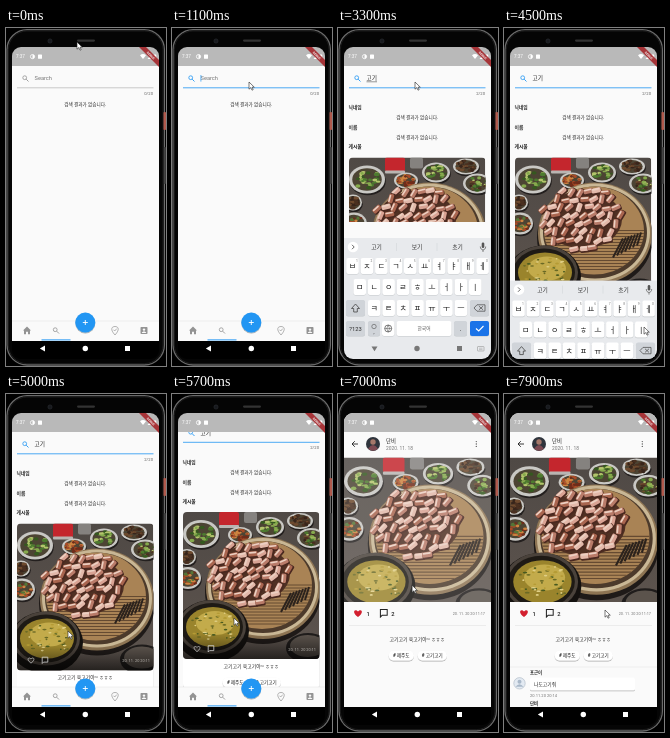
These frames come from a looping animation (160 by 338 pixels, 8000 ms). An HTML page:

```html
<!DOCTYPE html>
<html lang="ko">
<head>
<meta charset="utf-8">
<title>Search and open a post</title>
<style>
html, body { margin: 0; width: 100%; height: 100%; overflow: hidden; background: #000; }
svg { display: block; width: 100vw; height: 100vh; }
text { font-family: Roboto, "Noto Sans CJK KR", "Noto Sans CJK", sans-serif; }
</style>
</head>
<body>
<svg id="stage" viewBox="0 0 160 338"></svg>
<script>
const LOOP = 8000, STEP = 100;
const BLUE = '#2196f3', GREY = '#949494', INK = '#2b2b2b';

// Markup helpers
const text = (x, y, size, s, fill = INK, anchor = 'start', extra = '') =>
  `<text x="${x}" y="${y}" font-size="${size}" fill="${fill}" text-anchor="${anchor}" ${extra}>${s}</text>`;
const mid = (x, y, size, s, fill, extra) => text(x, y, size, s, fill, 'middle', extra);
const rect = (x, y, w, h, fill, r = 0, extra = '') =>
  `<rect x="${x}" y="${y}" width="${w}" height="${h}" rx="${r}" fill="${fill}" ${extra}/>`;
const oval = (x, y, rx, ry, fill, extra = '') =>
  `<ellipse cx="${x}" cy="${y}" rx="${rx}" ry="${ry}" fill="${fill}" ${extra}/>`;
const dot = (x, y, r, fill, extra) => oval(x, y, r, r, fill, extra);
const path = (d, fill, extra = '') => `<path d="${d}" fill="${fill}" ${extra}/>`;
const line = (d, color, w = 0.7) => path(d, 'none', `stroke="${color}" stroke-width="${w}"`);
const group = (id, body, extra = '') => `<g id="${id}" ${extra}>${body}</g>`;
const clip = (id, body) => `<clipPath id="${id}">${body}</clipPath>`;
const shadow = 'filter="url(#soft)"';

function random(seed) {
  return () => (seed = (seed * 16807) % 2147483647) / 2147483647;
}

// Icons
const lens = (x, y, color) =>
  `<g transform="translate(${x} ${y})">` +
  dot(-0.8, -0.8, 1.9, 'none', `stroke="${color}" stroke-width=".8"`) +
  line('M.7 .7L3 3', color, 0.9) + '</g>';
const heart = (x, y, s, fill, extra = '') =>
  path('M0 3.5C-7 -1.5 -3 -5.5 0 -2C3 -5.5 7 -1.5 0 3.5Z', fill,
    `transform="translate(${x} ${y}) scale(${s})" ${extra}`);
const bubble = (x, y, s, color) =>
  path('M-4 -4H4V3H-2L-4 5Z', 'none',
    `stroke="${color}" stroke-width="1.2" transform="translate(${x} ${y}) scale(${s})"`);

// Food picture, 136 by 147
function plate(x, y, rx, ry, colors, rnd) {
  let s = oval(x + 0.8, y + 1.8, rx, ry, '#231f1e') + oval(x, y, rx, ry, '#c9c8c4') +
    oval(x, y, rx * 0.82, ry * 0.8, '#4c4433');
  for (let i = 0; i < 30; i++) {
    const a = rnd() * 6.283, d = Math.sqrt(rnd()) * 0.7;
    s += oval((x + Math.cos(a) * rx * d).toFixed(1), (y + Math.sin(a) * ry * d).toFixed(1),
      1.2 + rnd() * 1.8, 0.8 + rnd(), colors[i % colors.length]);
  }
  return s;
}

function meat(rnd) {
  const tones = ['#d9a394', '#b97b69', '#e3b9aa', '#a9654f'];
  let s = oval(68, 62, 39, 29, '#4f3023');
  for (let row = 0; row < 8; row++) {
    for (let col = 0; col < 10; col++) {
      const x = 27 + col * 9 + (row % 2) * 4 + rnd() * 3, y = 33 + row * 8 + rnd() * 3;
      if (((x - 67) / 41) ** 2 + ((y - 61) / 32) ** 2 > 1) continue;
      const turn = rnd() * 80 - 85;
      s += `<g transform="translate(${x.toFixed(1)} ${y.toFixed(1)}) rotate(${turn.toFixed(0)})">` +
        rect(-4.6, -2.2, 10, 6, '#4a281f', 1.5) +
        rect(-4.7, -2.9, 9.4, 5, tones[Math.floor(rnd() * 4)], 1.4) +
        rect(-4, -2.4, 7.6, 1.6, '#ecd0c2', 0.8) + '</g>';
    }
  }
  return s;
}

function food() {
  const rnd = random(73);
  const greens = ['#4d7b2f', '#86aa4d', '#35581f', '#b3c46c'];
  const kimchi = ['#a84a26', '#cf8440', '#6f2c1a'];
  const dark = ['#38251b', '#6e4a2e', '#4a3020'];
  let s = rect(0, 0, 136, 147, 'url(#table)');
  s += rect(61, 0, 13, 11, '#85827f', 2) + rect(36, 0, 20, 14, '#c4262d', 2) +
    rect(36, 13, 20, 3, '#b9b5b2', 1);
  s += plate(18, 22, 18, 14, greens, rnd) + plate(57, 23, 12, 8, kimchi, rnd) +
    plate(87, 15, 14, 10, greens, rnd) + plate(117, 9, 13, 8, dark, rnd) +
    plate(128, 26, 14, 10, greens.concat(dark), rnd) + plate(4, 45, 9, 8, dark, rnd) +
    plate(5, 66, 13, 11, kimchi.concat('#557536'), rnd);
  s += oval(80, 80, 58, 52, '#1f1a18') + oval(80, 76, 57, 51, '#8d7453') +
    oval(80, 75, 55, 49, '#c9b795') + oval(80, 75, 52, 46, '#4c3a2b') +
    oval(79, 73, 50, 44, '#a98355');
  for (let i = 0; i < 14; i++) {
    const y = 73 + i * 3, w = 50 * Math.sqrt(1 - ((y - 73) / 44) ** 2);
    s += line(`M${79 - w} ${y}H${79 + w}`, '#654a31', 1);
  }
  for (let i = 0; i < 7; i++)
    s += line(`M${98 + i * 4} ${100 - i * 2}L${108 + i * 3} ${81 - i}`, '#2c231d', 2);
  s += meat(rnd);
  s += oval(29, 119, 37, 31, '#14110f') + oval(29, 115, 34, 27, '#4a423b') +
    oval(29, 115, 31, 24, '#1e1a15') + oval(30, 115, 27, 20, '#9a842c') +
    oval(32, 111, 19, 12, '#c3ab4b');
  for (let i = 0; i < 45; i++)
    s += oval(9 + rnd() * 42, 101 + rnd() * 27, 0.8 + rnd() * 1.6, 0.8,
      ['#e0cf86', '#6b6a25', '#47591f', '#b59b35'][i % 4]);
  return s + oval(125, 136, 22, 15, '#1f1c1b') + oval(125, 134, 18, 11, '#5b534c');
}

// Keyboard
function keyboard() {
  const key = (x, y, w, h = 16, fill = '#fff') =>
    rect(x, y + 0.6, w, h, '#c3c7ca', 2) + rect(x, y, w, h, fill, 2);
  const row = (letters, x0, y, digits) => [...letters].map((c, i) => {
    const x = x0 + i * 14.45;
    return key(x - 6.3, y, 12.6) + mid(x, y + 11.3, 8, c, '#222') +
      (digits ? text(x + 5.4, y + 4.4, 3.3, (i + 1) % 10, '#777', 'end') : '');
  }).join('');
  const dark = '#d0d4d9';
  return rect(6, 210, 147, 121, '#e8eaed') +
    dot(15, 219, 5.3, '#fff') + line('M14 216.8L16.2 219L14 221.2', '#555', 0.9) +
    rect(143.7, 214.5, 2.6, 5.5, '#555', 1.3) +
    line('M142.3 218.5C142.3 223 147.7 223 147.7 218.5M145 222V224', '#555') +
    group('hints', '') +
    row('ㅂㅈㄷㄱㅅㅛㅕㅑㅐㅔ', 14.5, 230, true) + row('ㅁㄴㅇㄹㅎㅗㅓㅏㅣ', 21.7, 251) +
    row('ㅋㅌㅊㅍㅠㅜㅡ', 36.2, 272) +
    key(8, 272, 19, 16, dark) + line('M17.5 276L13.5 280.5H15.7V284H19.3V280.5H21.5Z', '#444', 0.8) +
    key(132, 272, 19, 16, dark) +
    line('M136 280L139 276.8H147V283.2H139ZM141 278.2L145 281.8M145 278.2L141 281.8', '#444') +
    key(8, 293, 19, 15, dark) + mid(17.5, 302.8, 5.8, '?123') +
    key(30, 293, 12, 15, dark) + dot(36, 298.5, 2.2, 'none', 'stroke="#555" stroke-width=".6"') +
    mid(36, 306, 5, ',') +
    key(44, 293, 12.5, 15) + dot(50.2, 300.5, 3.5, 'none', 'stroke="#444" stroke-width=".7"') +
    line('M46.7 300.5H53.7M50.2 297Q47.4 300.5 50.2 304Q53 300.5 50.2 297', '#444', 0.5) +
    key(58.5, 293, 55, 15) + mid(86, 302.3, 4.8, '한국어', '#555') +
    key(116, 293, 13, 15, dark) + mid(122.5, 303, 7, '.') +
    key(132, 293, 19, 15, '#1a73e8') + line('M138 300.5L140.7 303L145.5 298', '#fff', 1.1) +
    path('M33.5 318.5H39.5L36.5 323.3Z', '#777') + dot(79, 320.5, 2.7, '#777') +
    rect(119, 318, 5, 5, '#777') +
    rect(139.5, 318.5, 6.5, 4.5, 'none', 0.5, 'stroke="#999" stroke-width=".6"') +
    line('M141 320.2H144.5M141 321.6H144.5', '#999', 0.5);
}

// Search screen
const EMPTY = '검색 결과가 없습니다.';
const CAPTION = '고기고기 육고기야~ ㅎㅎㅎ';
const tags = y => [[50.5, 25.5, '# 제주도'], [79.5, 29.5, '# 고기고기']].map(([x, w, s]) =>
  rect(x, y - 4.8, w, 9.6, '#fff', 4.8, shadow) +
  mid(x + w / 2, y + 1.7, 4.6, s, '#111', 'font-weight="500"')).join('');

const searchPage = () =>
  rect(6, 38, 147, 275, '#fafafa') +
  `<g clip-path="url(#body)">` + group('list',
    group('field', '') +
    group('none', mid(79.3, 78, 4.65, EMPTY)) +
    group('found',
      [['닉네임', 81], ['이름', 101], ['게시물', 120]].map(([s, y]) =>
        text(10.5, y, 4.8, s, '#222', 'start', 'font-weight="700"')).join('') +
      mid(79.3, 91, 4.65, EMPTY) + mid(79.3, 111, 4.65, EMPTY) +
      rect(11, 129.5, 136.5, 176, '#fff', 4, shadow) +
      `<g transform="translate(11 129.5)" clip-path="url(#card)"><use href="#food"/>` +
      rect(0, 122, 136.5, 25, 'url(#shade)') + '</g>' +
      heart(25, 266.5, 0.75, 'none', 'stroke="#ccc" stroke-width="1"') + bubble(39, 266, 0.7, '#ccc') +
      text(144, 268, 3.9, '20. 11. 20 20:11', '#b5b1ab', 'end') +
      mid(79.2, 285, 4.9, CAPTION) + tags(300))) + '</g>' +
  group('gap', rect(6, 194, 147, 119, '#fafafa')) +
  rect(6, 293, 147, 20, '#fafafa') + line('M6 293H153', '#e2e2e2', 0.5) +
  path('M17 302.5L21 298.5L25 302.5H24V306.3H22V303.7H20V306.3H18V302.5Z', GREY) +
  lens(50, 302.5, GREY) +
  line('M109 307C103.5 301 106 298.5 109 298.5C112 298.5 114.5 301 109 307M107.5 301.7L108.7 303L110.8 300.6', GREY) +
  rect(134.5, 299, 7, 7, GREY, 0.8) + dot(138, 301.6, 1.2, '#fafafa') +
  path('M135.8 305C136 303 140 303 140.2 305Z', '#fafafa') +
  rect(35.5, 311.4, 29, 1, BLUE) +
  dot(79.3, 294.5, 10, BLUE, shadow) + line('M76.8 294.5H81.8M79.3 292V297', '#fff', 0.9);

// Post screen
function comment(y, name, body, date) {
  return text(26, y, 4.4, name, '#222', 'start', 'font-weight="700"') +
    dot(15.5, y + 9, 5.7, '#e3eaf2', 'stroke="#a9b5c1" stroke-width=".6"') +
    dot(15.5, y + 7.5, 2, '#a9b8c9') + path(`M11.5 ${y + 12.5}Q15.5 ${y + 7.5} 19.5 ${y + 12.5}Z`, '#a9b8c9') +
    rect(26, y + 3, 105, 13, '#fff', 1.5, shadow) + text(30, y + 11.3, 4.8, body) +
    text(26, y + 22.4, 4.1, date, '#777');
}

const postPage = () =>
  rect(6, 38, 147, 275, '#fafafa') +
  line('M20 50H14M16.8 47.2L14 50L16.8 52.8', '#222', 0.9) +
  dot(35, 50, 7, '#30353d') + dot(35, 48, 2.7, '#a5786a') + path('M30 54.7Q35 47.5 40 54.7Q35 59 30 54.7Z', '#7d4a52') +
  text(48, 48.6, 5.4, '단비', '#222') + text(48, 55.7, 4.9, '2020. 11. 18', '#777') +
  [47.6, 50, 52.4].map(y => dot(138.3, y, 0.65, '#555')).join('') +
  group('photo', `<g clip-path="url(#wide)"><g transform="translate(6 63.5) scale(1.081)"><use href="#food"/></g></g>`) +
  heart(20, 219.5, 1, '#d3202f') + text(28.5, 221.6, 5.8, '1', '#222', 'start', 'font-weight="500"') +
  bubble(45.8, 218.8, 0.85, '#222') + text(53.3, 221.6, 5.8, '2', '#222', 'start', 'font-weight="500"') +
  text(147, 220.8, 3.8, '20. 11. 20 20:11:17', '#777', 'end') +
  line('M11 231.5H148', '#ddd', 0.5) +
  mid(79.2, 246.6, 4.9, CAPTION) + tags(261.6) +
  group('comments', line('M6 273H153', '#e0e0e0', 0.5) +
    `<g clip-path="url(#body)">` +
    comment(280.3, '포근이', '나도고기줘', '20.11.20 20:14') +
    comment(311, '단비', '', '') + '</g>');

const phone = () =>
  rect(0, 0, 160, 338, '#000') +
  rect(1, 1.6, 157.4, 335.4, '#050505', 20, 'stroke="#6a6a6a" stroke-width="1.3"') +
  rect(2.4, 3, 154.6, 332.6, 'none', 18.5, 'stroke="#222" stroke-width=".8"') +
  rect(157.5, 84, 2.5, 18, '#b0594c', 0.8) + rect(157.8, 119, 2, 37, '#444', 0.8) +
  dot(44, 13, 2.1, '#17191d', 'stroke="#2d3034" stroke-width=".6"') + rect(71, 11.5, 18, 2.2, '#333', 1.1);

const statusBar = () =>
  rect(6, 19, 147, 19, '#b9b9b9') +
  text(10, 30.3, 4.6, '7:37', '#fff') +
  dot(26.5, 28.6, 2.1, 'none', 'stroke="#fff" stroke-width=".8"') + path('M26.5 26.5A2.1 2.1 0 0 1 26.5 30.7Z', '#fff') +
  rect(32, 26.5, 4, 4.3, '#fff', 0.6) +
  path('M134 27.2Q137 25 140 27.2L137 31Z', '#fff') + path('M141.5 31H145.5V26.5Z', '#fff') +
  rect(147.5, 26.5, 2.7, 4.5, '#fff', 0.4) +
  path('M133 19H140L153 32V39Z', '#a5262b', 'opacity=".9"') +
  `<text font-size="3" fill="#fff" font-weight="700" text-anchor="middle" transform="translate(144 28.2) rotate(45)">DEBUG</text>`;

const navBar = () =>
  rect(6, 313, 147, 18, '#000') +
  path('M39 317.5V323.5L33.8 320.5Z', '#fff') + dot(79.3, 320.5, 2.7, '#fff') + rect(119, 318, 5, 5, '#fff');

const stage = document.getElementById('stage');
stage.innerHTML = `<defs>
  <linearGradient id="table" x2="0" y2="1"><stop stop-color="#4f4945"/><stop offset="1" stop-color="#5d544e"/></linearGradient>
  <linearGradient id="shade" x2="0" y2="1"><stop stop-color="#000" stop-opacity="0"/><stop offset="1" stop-color="#000" stop-opacity=".6"/></linearGradient>
  <filter id="soft" x="-20%" y="-20%" width="140%" height="150%"><feDropShadow dx="0" dy=".8" stdDeviation=".7" flood-opacity=".4"/></filter>
  ${clip('screen', rect(6, 19, 147, 312, '#000', 9))}${clip('body', rect(6, 38, 147, 275))}
  ${clip('card', rect(0, 0, 136.5, 147, '#000', 4))}${clip('wide', rect(6, 63.5, 147, 144.5))}
  <g id="food">${food()}</g></defs>` +
  phone() + `<g clip-path="url(#screen)">` + searchPage() +
  group('veil', rect(6, 19, 147, 294, '#fff')) + group('post', postPage()) + statusBar() +
  group('haze', rect(6, 19, 147, 19, '#fff')) + navBar() + group('keys', keyboard()) + '</g>' +
  dot(61.5, 194, 1.7, '#3f74c8', 'id="spot"') +
  path('M0 0V7.2L1.8 5.6L3 8.2L4.2 7.6L3 5.2H5.3Z', '#fff', 'id="cursor" stroke="#222" stroke-width=".6"');

const $ = id => document.getElementById(id);
const show = (id, on) => $(id).setAttribute('opacity', Number(on));
const move = (id, x, y) => $(id).setAttribute('transform', `translate(${x} ${y})`);

// Eased value along [time, ...values] points
function track(points, t) {
  if (t <= points[0][0]) return points[0].slice(1);
  for (let i = 1; i < points.length; i++) {
    const a = points[i - 1], b = points[i];
    if (t < b[0]) {
      const p = (t - a[0]) / (b[0] - a[0]), e = p * p * (3 - 2 * p);
      return a.slice(1).map((v, k) => v + (b[k + 1] - v) * e);
    }
  }
  return points.at(-1).slice(1);
}

const CURSOR = [[100, 71, 14], [700, 114, 54], [800, 114, 54], [1100, 77, 54], [3700, 77, 54],
  [4300, 140, 299], [4600, 140, 299], [5000, 62, 237], [5400, 62, 237], [5900, 62, 217],
  [6300, 73, 190], [6900, 73, 190], [7300, 80, 198], [7800, 101, 216]];
const KEYS = [[1100, 121], [1500, 0], [4300, 0], [4800, 121]];
const SCROLL = [[5400, 0], [5700, 11.5], [6000, 20]];
const VEIL = [[6300, 0], [6500, 0.62], [6700, 1]];
const HAZE = [[6300, 0], [6500, 0.5], [6800, 0]];
const TYPED = [[0, ''], [1900, 'ㄱ'], [2200, '고'], [2500, '곡'], [2800, '고기']];
const HINTS = { 'ㄱ': ['ㄱ', '그', '가'], '고': ['고', '그', '또'], '곡': ['곡', '고기', '그'], '고기': ['고기', '보기', '초기'] };

let shownField = null;
function drawField(word, focused, editing, caret) {
  const state = [word, focused, editing, caret].join();
  if (state === shownField) return;
  shownField = state;
  const color = focused ? BLUE : GREY, end = 28.5 + word.length * 5.25;
  $('field').innerHTML = lens(19.5, 50.5, color) +
    (word ? text(28.5, 52.4, 5.7, word, '#222') : text(28.5, 52.4, 5.7, 'Search', '#777')) +
    (editing && word ? line(`M28.5 53.8H${end}`, '#333', 0.5) : '') +
    (caret ? line(`M${end + 0.4} 47V53.6`, BLUE, 0.7) : '') +
    line('M11 59.8H147.5', color, focused ? 0.8 : 0.5) +
    text(147, 66.7, 4.2, word.length + '/20', '#666', 'end');
  $('hints').innerHTML = (HINTS[word] || []).map((s, i) => mid(38.5 + i * 40.5, 221.2, 5.8, s, '#333')).join('') +
    line('M58.5 215V223M99 215V223', '#cfd2d5', 0.5);
}

function render(t) {
  const word = TYPED.findLast(([at]) => t >= at)[1];
  const editing = t >= 1100 && t < 4400;
  drawField(word, t >= 1100, editing, editing && t < 3000);
  show('none', t < 3000);
  show('found', t >= 3000);
  const [drop] = track(KEYS, t);
  show('keys', drop < 121);
  move('keys', 0, drop);
  show('gap', t >= 1400 && t < 4400);
  move('list', 0, -track(SCROLL, t)[0]);
  show('veil', track(VEIL, t)[0]);
  show('haze', track(HAZE, t)[0]);
  show('post', track([[6600, 0], [6900, 1]], t)[0]);
  show('photo', track([[6700, 0], [7100, 1]], t)[0]);
  show('comments', track([[7200, 0], [7500, 1]], t)[0]);
  show('spot', t >= 6400 && t < 6700);
  move('cursor', ...track(CURSOR, t));
}

const start = performance.now();
function tick() {
  const t = (performance.now() - start) % LOOP;
  render(Math.floor(t / STEP) * STEP);
  requestAnimationFrame(tick);
}
tick();
</script>
</body>
</html>
```
